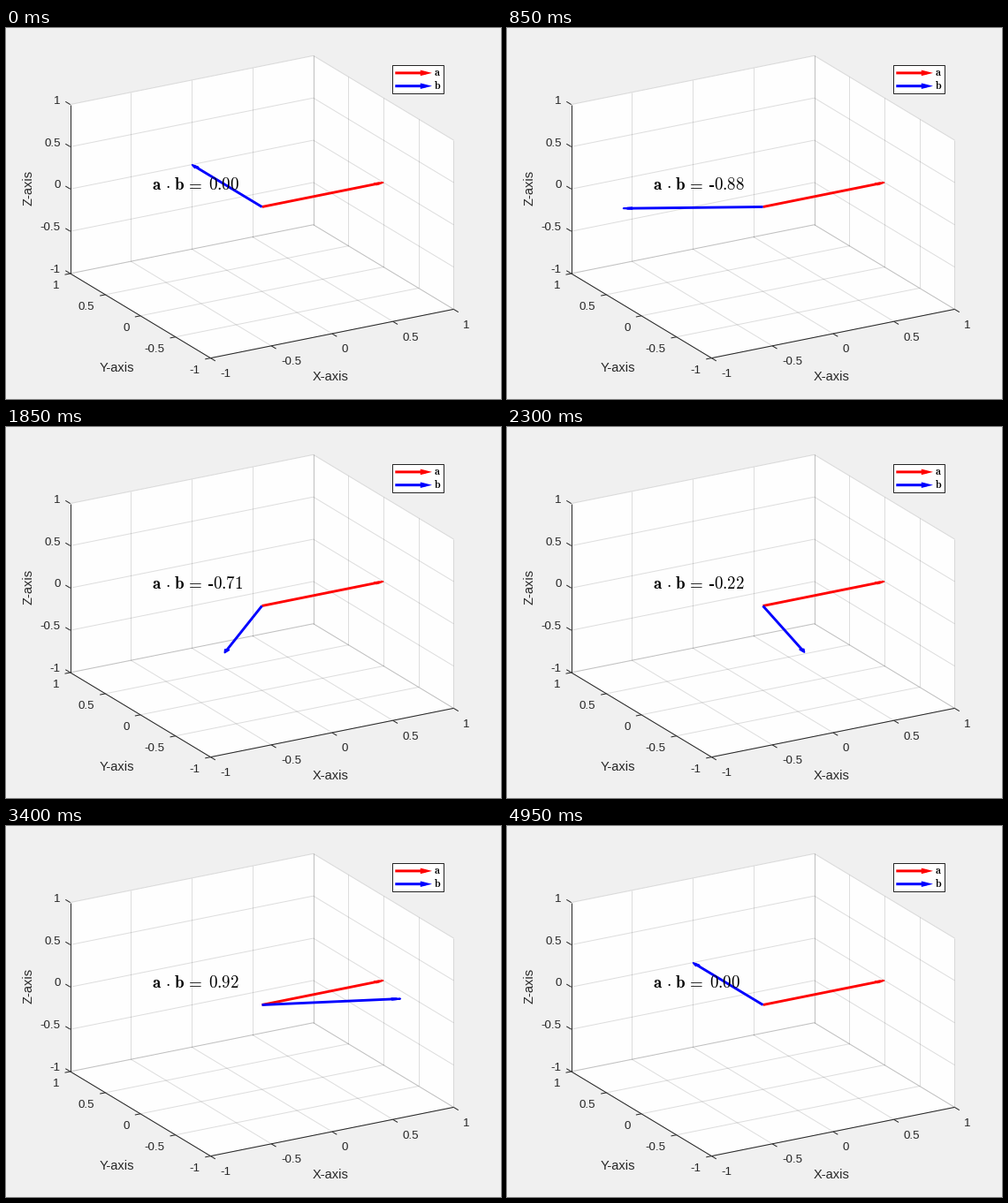
Write a matplotlib script that moves like this. It is 560 by 420 pixels and loops after 5 s.

```python
import numpy as np
import matplotlib.pyplot as plt
from matplotlib.animation import FuncAnimation
from matplotlib.patches import Polygon, Rectangle

W, H, DPI = 560, 420, 100
FRAMES, INTERVAL = 100, 50
DARK = (0.15, 0.15, 0.15)
WALL = (0.996,) * 3
RED, BLUE = (1, 0, 0), (0, 0, 1)
TICKS = (-1, -0.5, 0, 0.5, 1)

plt.rcParams["font.family"] = "Liberation Sans"
plt.rcParams["mathtext.fontset"] = "cm"

# Orthographic view: azimuth -30, elevation 30, stretched to the axes box
ORIGIN = np.array([289.55, 202.5])
BASIS = np.array([[137.5, -27.62], [-79.35, -47.84], [0, -95.68]])

fig = plt.figure(figsize=(W / DPI, H / DPI), dpi=DPI, facecolor=(0.94,) * 3)
ax = fig.add_axes([0, 0, 1, 1])
ax.set_xlim(0, W)
ax.set_ylim(H, 0)
ax.axis("off")


def pt(px):
    return px * 72 / DPI


def project(*p):
    return ORIGIN + np.array(p) @ BASIS


def line(p, q, color=DARK, width=1, **kw):
    return ax.plot([p[0], q[0]], [p[1], q[1]], color=color, lw=pt(width),
                   solid_capstyle="butt", **kw)[0]


def label(x, y, text, px, **kw):
    return ax.text(x, y, text, fontsize=pt(px), va="baseline", **kw)


def draw_walls():
    faces = (
        [(-1, -1, -1), (1, -1, -1), (1, 1, -1), (-1, 1, -1)],
        [(-1, 1, -1), (1, 1, -1), (1, 1, 1), (-1, 1, 1)],
        [(1, -1, -1), (1, 1, -1), (1, 1, 1), (1, -1, 1)],
    )
    for face in faces:
        ax.add_patch(Polygon([project(*p) for p in face], fc=WALL, ec=WALL,
                             lw=0.3, zorder=0))
    for t in TICKS:
        pairs = (
            ((t, -1, -1), (t, 1, -1)), ((-1, t, -1), (1, t, -1)),
            ((t, 1, -1), (t, 1, 1)), ((-1, 1, t), (1, 1, t)),
            ((1, t, -1), (1, t, 1)), ((1, -1, t), (1, 1, t)),
        )
        for p, q in pairs:
            line(project(*p), project(*q), alpha=0.15, zorder=1)


def draw_axes():
    corner = project(-1, 1, -1)
    front = project(-1, -1, -1)
    line(front, project(1, -1, -1), zorder=2)
    line(front, corner, zorder=2)
    line(corner, project(-1, 1, 1), zorder=2)

    x_dir, y_dir = (v / np.hypot(*v) * 6.3 for v in BASIS[:2])
    for t in TICKS:
        text = f"{t:g}"
        rows = (
            (project(t, -1, -1), -y_dir, (10.9, 21.4), "left"),
            (project(-1, t, -1), -x_dir, (-12.4, 17.4), "right"),
            (project(-1, 1, t), y_dir, (-11, -0.8), "right"),
        )
        for p, tick, shift, ha in rows:
            line(p, p + tick, zorder=2)
            label(*(p + shift), text, 13.33, ha=ha, color=DARK)

    label(367.5, 399, "X-axis", 14.67, ha="center", color=DARK)
    label(125.5, 389, "Y-axis", 14.67, ha="center", color=DARK)
    ax.text(33, 181.3, "Z-axis", fontsize=pt(14.67), rotation=90,
            ha="right", va="center", color=DARK)


def draw_legend():
    ax.add_patch(Rectangle((437, 42), 58, 32, fc="white", ec=DARK,
                           lw=pt(1), zorder=6))
    for y, color, name in ((50.9, RED, "a"), (65.7, BLUE, "b")):
        line((440.3, y), (475, y), color, 3, zorder=7, snap=False)
        head = [(468.8, y - 3.3), (482, y), (468.8, y + 3.3)]
        ax.add_patch(Polygon(head, fc=color, lw=0, zorder=7))
        label(484.2, y + 3.3, rf"$\mathbf{{{name}}}$", 12, zorder=8)


class Arrow:
    """Unit vector in the z = 0 plane with a flat head in that plane."""

    def __init__(self, color, zorder):
        self.shaft = line(ORIGIN, ORIGIN, color, 2.9, zorder=zorder)
        self.head = Polygon([ORIGIN] * 3, fc=color, ec=color, lw=pt(1.8),
                            joinstyle="round", zorder=zorder)
        ax.add_patch(self.head)

    def point(self, angle):
        d = np.array([np.cos(angle), np.sin(angle), 0])
        side = np.array([-d[1], d[0], 0]) * 0.015
        end = project(*(d * 0.97))
        self.shaft.set_data([ORIGIN[0], end[0]], [ORIGIN[1], end[1]])
        self.head.set_xy([project(*(d * 0.933 + side)), project(*(d * 0.995)),
                          project(*(d * 0.933 - side))])


class Formula:
    """The dot product, set with an em of 19 pixels."""

    EM, X, Y = 19, 165.3, 183.3
    VALUE, HYPHEN = 3.33, 0.3

    def __init__(self):
        # mathtext pads "=" by 0.2 em, so it starts that much earlier
        parts = ((0, r"\mathbf{a}"), (0.781, r"\cdot"),
                 (1.281, r"\mathbf{b}"), (1.998, "="))
        for offset, tex in parts:
            self.put(offset, tex)
        self.value = self.put(self.VALUE, "0.00")
        x = self.X + self.VALUE * self.EM + 0.7
        self.hyphen = Rectangle((x, self.Y - 4.9), 5, 1.3, fc="black", lw=0,
                                zorder=9)
        ax.add_patch(self.hyphen)

    def put(self, offset, tex):
        return label(self.X + offset * self.EM, self.Y, f"${tex}$", self.EM,
                     zorder=9)

    def show(self, value):
        value = round(value, 2)
        negative = value < 0
        offset = self.VALUE + self.HYPHEN * negative
        self.value.set_text(f"${abs(value):.2f}$")
        self.value.set_x(self.X + offset * self.EM)
        self.hyphen.set_visible(negative)


draw_walls()
draw_axes()
draw_legend()
arrow_a = Arrow(RED, 4)
arrow_b = Arrow(BLUE, 5)
formula = Formula()
arrow_a.point(0)


def update(i):
    angle = np.pi / 2 + 2 * np.pi * i / (FRAMES - 1)
    arrow_b.point(angle)
    formula.show(float(np.cos(angle)))
    return []


anim = FuncAnimation(fig, update, frames=FRAMES, interval=INTERVAL,
                     init_func=lambda: update(0), repeat=True,
                     repeat_delay=0, blit=False)
plt.show()
```
